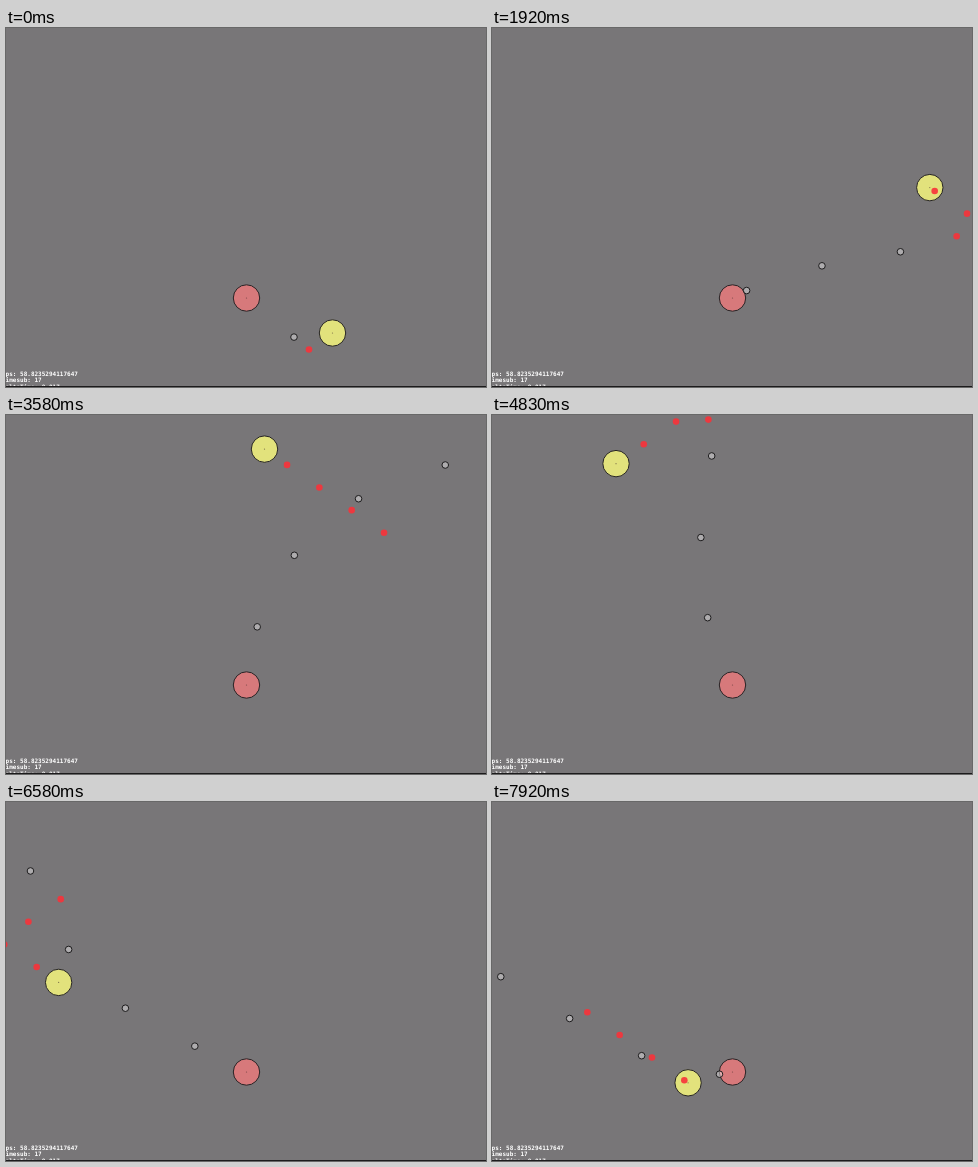
An HTML page with a canvas for the animation above (8000 ms loop, 480 by 359 pixels).

```html
<!DOCTYPE html>
<html lang="en">
<head>
<meta charset="utf-8">
<title>Turret and drifter</title>
<style>
  html, body { margin: 0; width: 100%; height: 100%; overflow: hidden; background: #787678; }
  canvas { display: block; }
</style>
</head>
<body>
<canvas id="stage" width="480" height="359"></canvas>
<script>
const ctx = document.getElementById('stage').getContext('2d');
const LOOP = 8000;
const FPS = 12;
const BOUNDS = { left: -5.8, right: 486, top: -5.7, bottom: 365 };
const TURRET = { x: 240.5, y: 270 };
const FIRST_SHOT = -23.5;   // shots are spaced by the drifter's horizontal travel
const SHOT_GAP = 32.33;
const BULLET_SPEED = 2.447; // pixels per unit of travel
const MUZZLE = 4;

// Reflects a value back and forth between two walls.
function bounce(value, low, high) {
  const span = high - low;
  const phase = (((value - low) % (2 * span)) + 2 * span) % (2 * span);
  return low + (phase < span ? phase : 2 * span - phase);
}

function drifterAt(travel) {
  return {
    x: bounce(326.5 + travel, BOUNDS.left, BOUNDS.right),
    y: bounce(305 - 0.7 * travel, BOUNDS.top, BOUNDS.bottom)
  };
}

function inBounds({ x, y }) {
  return x > BOUNDS.left && x < BOUNDS.right && y > BOUNDS.top && y < BOUNDS.bottom;
}

// Each shot flies through the spot where the drifter was when it was fired.
function liveShots(travel) {
  const shots = [];
  for (let fired = FIRST_SHOT; fired <= travel; fired += SHOT_GAP) {
    const aim = drifterAt(fired);
    const angle = Math.atan2(aim.y - TURRET.y, aim.x - TURRET.x);
    const distance = MUZZLE + BULLET_SPEED * (travel - fired);
    const bullet = {
      x: TURRET.x + distance * Math.cos(angle),
      y: TURRET.y + distance * Math.sin(angle)
    };
    if (inBounds(bullet)) shots.push({ aim, bullet });
  }
  return shots;
}

function disc({ x, y }, radius, fill, outline) {
  ctx.beginPath();
  ctx.arc(x, y, radius, 0, 2 * Math.PI);
  ctx.fillStyle = fill;
  ctx.fill();
  if (outline) {
    ctx.strokeStyle = outline;
    ctx.lineWidth = 1;
    ctx.stroke();
  }
}

function ball(center, fill) {
  disc(center, 13.2, fill, '#252325');
  disc(center, 0.6, 'rgba(60, 40, 40, 0.6)');
}

function drawStats(frame) {
  const delta = frame % 7 === 3 ? 16 : 17;
  const lines = [
    'fps: ' + (delta === 16 ? '62.5' : '58.8235294117647'),
    'timesub: ' + delta,
    'deltaTime: 0.0' + delta
  ];
  ctx.font = 'bold 6px "DejaVu Sans Mono", monospace';
  ctx.fillStyle = '#fff';
  lines.forEach((line, i) => ctx.fillText(line, -4, 347.8 + 6.6 * i));
}

function draw(time) {
  const frame = Math.floor((time % LOOP + 5) * FPS / 1000);
  const travel = 8.965 * frame + 1.5 * Math.min(1, frame / 10);
  const shots = liveShots(travel);

  ctx.fillStyle = '#787678';
  ctx.fillRect(0, 0, 480, 359);
  ball(TURRET, '#d7797b');
  ball(drifterAt(travel), '#e2e27c');
  shots.forEach(({ aim }) => disc(aim, 3.3, 'rgba(248, 50, 56, 0.9)'));
  shots.forEach(({ bullet }) => disc(bullet, 3.3, 'rgba(255, 255, 255, 0.4)', '#1c1b1c'));
  drawStats(frame);
  ctx.fillStyle = '#1c1b1c';
  ctx.fillRect(0, 358, 480, 1);
}

const start = performance.now();
function tick() {
  draw(performance.now() - start);
  requestAnimationFrame(tick);
}
tick();
</script>
</body>
</html>
```
